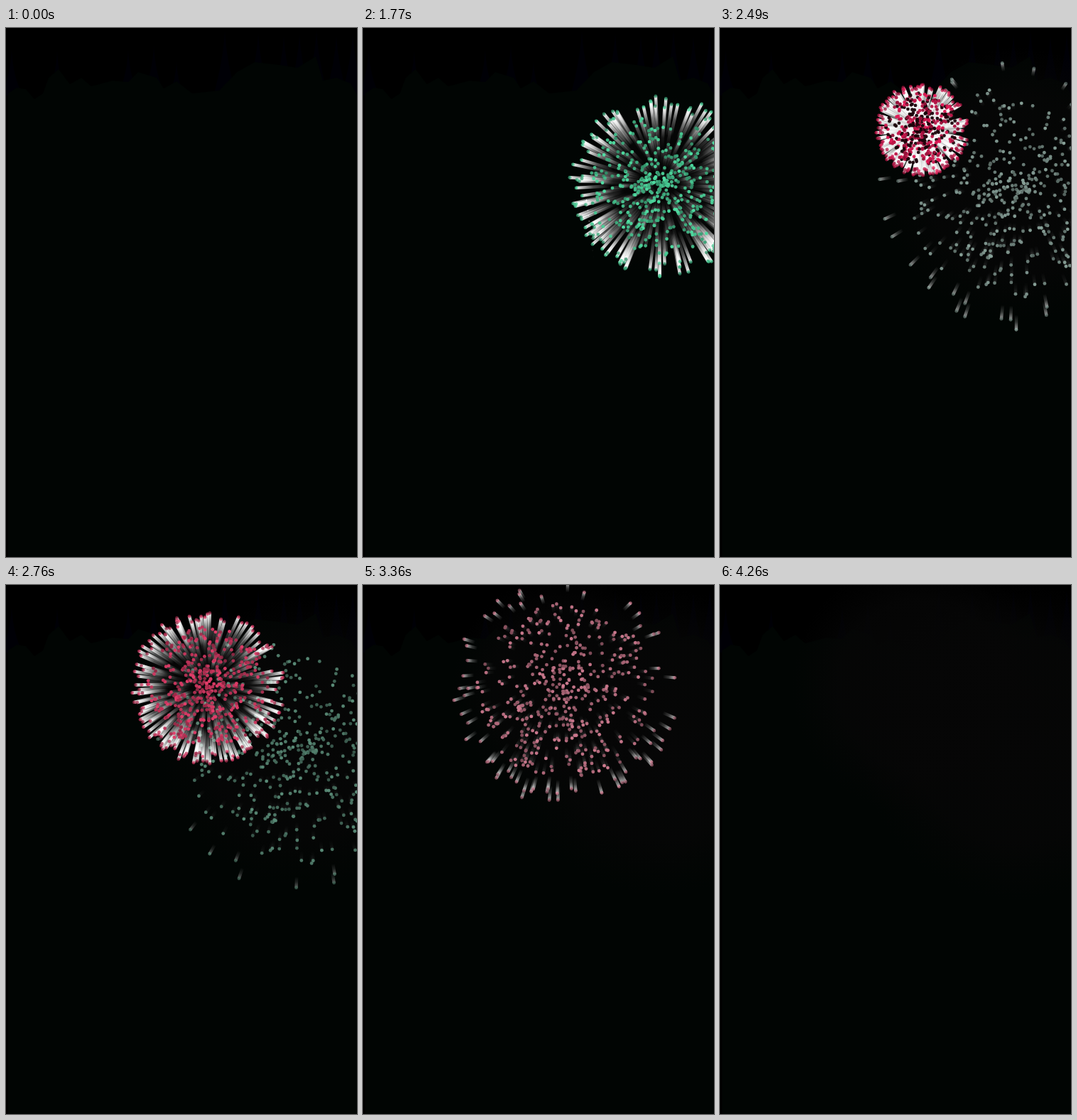
Write an HTML page with a canvas that moves like this. It is 494 px wide and 744 px high and loops after 6330 ms.

```html
<!DOCTYPE html>
<html lang="en">
<head>
<meta charset="utf-8">
<title>Fireworks</title>
<style>
  html, body { margin: 0; width: 100%; height: 100%; overflow: hidden; background: #000; }
  canvas { display: block; width: 100%; height: 100%; }
</style>
</head>
<body>
<canvas id="sky" width="494" height="744"></canvas>
<script>
const W = 494, H = 744, LOOP = 6330, STEP = 30;
const DRAG = 0.955, FALL = 0.006, TAIL = 9;
const ctx = document.getElementById('sky').getContext('2d');
const clamp = (v, lo = 0, hi = 1) => Math.min(hi, Math.max(lo, v));

function seeded(s) {
  return () => {
    s = (s + 0x6D2B79F5) | 0;
    let t = Math.imul(s ^ (s >>> 15), 1 | s);
    t = (t + Math.imul(t ^ (t >>> 7), 61 | t)) ^ t;
    return ((t ^ (t >>> 14)) >>> 0) / 4294967296;
  };
}

// Horizon of the dark glow and the spires above it, x then y
const RIDGE = [0, 92, 15, 84, 28, 86, 40, 100, 52, 92, 60, 70, 74, 58, 90, 79, 106, 70,
  120, 82, 150, 74, 172, 76, 186, 62, 212, 70, 222, 85, 240, 75, 262, 92, 300, 88,
  325, 62, 350, 48, 385, 52, 410, 56, 436, 40, 446, 74, 465, 70, 485, 78, 494, 94];
const SPIRES = [8, 30, 72, 32, 172, 30, 208, 24, 240, 46, 308, 3, 355, 6, 391, 10,
  413, 8, 437, 2, 465, 10, 488, 6];

// Rockets rise in steps: v is speed, a its loss, per step
const rockets = [
  { start: 480, x: 365, y: 731, vx: 1.9, v: 34.6, a: 1.16, steps: 25 },
  { start: 1140, x: 355, y: 729, vx: -1.93, v: 32.8, a: 0.9185, steps: 36 }
];

// Colour stops: age in seconds, r, g, b
const bursts = [
  { start: 1230, x: 419, y: 220, reach: 224, seed: 11,
    tint: [[0.27, 20, 215, 130], [0.54, 76, 214, 156], [1.26, 132, 156, 148], [1.77, 48, 118, 88]] },
  { start: 2220, x: 284, y: 142, reach: 190, seed: 29,
    tint: [[0.27, 218, 24, 82], [0.78, 218, 88, 118], [1.53, 182, 152, 162], [1.9, 110, 55, 70]] }
];
bursts.forEach(b => { b.sparks = makeSparks(b.seed); });

function makeSparks(seed) {
  const rnd = seeded(seed), list = [];
  for (let i = 0; i < 560; i++) {
    const rim = i < 130, angle = rnd() * Math.PI * 2;
    const speed = rim ? 1.02 - 0.16 * rnd() : 0.8 * rnd() ** 0.75;
    list.push({
      rim, dx: Math.cos(angle) * speed, dy: Math.sin(angle) * speed,
      life: rim ? 0.8 + 0.95 * rnd() ** 1.5 : 1.66 + 0.38 * rnd(),
      shade: 0.65 + 0.42 * rnd(), dark: !rim && rnd() < 0.4, phase: rnd() * 100
    });
  }
  return list;
}

function tintAt(stops, age) {
  if (age <= stops[0][0]) return stops[0].slice(1);
  for (let i = 1; i < stops.length; i++) {
    const a = stops[i - 1], b = stops[i];
    if (age <= b[0]) {
      const k = (age - a[0]) / (b[0] - a[0]);
      return [1, 2, 3].map(c => a[c] + (b[c] - a[c]) * k);
    }
  }
  return stops[stops.length - 1].slice(1);
}

const rgbOf = (rgb, scale, add = 0) =>
  `rgb(${rgb.map(c => Math.min(255, Math.round(c * scale + add))).join()})`;

function place(b, p, n) {
  const r = b.reach * (1 - DRAG ** n);
  return [b.x + p.dx * r, b.y + p.dy * r + FALL * n * n];
}

function disc(x, y, r) {
  ctx.beginPath();
  ctx.arc(x, y, r, 0, Math.PI * 2);
  ctx.fill();
}

function drawSky() {
  ctx.fillStyle = '#000';
  ctx.fillRect(0, 0, W, H);
  ctx.fillStyle = '#000006';
  for (let i = 0; i < SPIRES.length; i += 2) {
    const x = SPIRES[i], y = SPIRES[i + 1];
    ctx.beginPath();
    ctx.moveTo(x, y);
    ctx.quadraticCurveTo(x + 2, y + 40, x + 16, 95);
    ctx.lineTo(x - 16, 95);
    ctx.quadraticCurveTo(x - 2, y + 40, x, y);
    ctx.fill();
  }
  ctx.beginPath();
  ctx.moveTo(3, H);
  for (let i = 0; i < RIDGE.length; i += 2) ctx.lineTo(Math.max(3, RIDGE[i]), RIDGE[i + 1]);
  ctx.lineTo(W, H);
  ctx.fillStyle = '#010503';
  ctx.fill();
}

// Faint smoke that stays after a burst
function drawSmoke(b, n) {
  const r = 1 + b.reach * (1 - DRAG ** n);
  const g = ctx.createRadialGradient(b.x, b.y, 0, b.x, b.y, r);
  g.addColorStop(0, 'rgba(6,6,6,.95)');
  g.addColorStop(0.65, 'rgba(6,6,6,.8)');
  g.addColorStop(1, 'rgba(5,5,5,0)');
  ctx.fillStyle = g;
  disc(b.x, b.y, r);
}

function drawRocket(k, t) {
  const n = (t - k.start) / STEP;
  if (n <= 0 || n >= k.steps) return;
  const at = m => [k.x + k.vx * m, k.y - k.v * m + k.a * m * m / 2];
  ctx.fillStyle = '#fff';
  for (let i = 10; i > 0; i--) {
    const m = n - i / 2;
    if (m < 0) continue;
    const [x, y] = at(m);
    ctx.globalAlpha = 0.75 * (1 - i / 11) ** 1.6;
    ctx.fillRect(x - 0.8, y - 0.8, 1.7, 1.7);
  }
  const [x, y] = at(n);
  ctx.globalAlpha = 1;
  ctx.fillRect(x - 1.5, y - 0.5, 3, 1);
  ctx.fillRect(x - 0.5, y - 1.5, 1, 3);
}

function drawTail(b, p, n, power) {
  const [x0, y0] = place(b, p, Math.max(0, n - TAIL));
  const [x1, y1] = place(b, p, n);
  const g = ctx.createLinearGradient(x0, y0, x1, y1);
  g.addColorStop(0, 'rgba(255,255,255,0)');
  g.addColorStop(0.5, `rgba(255,255,255,${0.3 * power})`);
  g.addColorStop(1, `rgba(255,255,255,${power})`);
  ctx.strokeStyle = g;
  ctx.beginPath();
  ctx.moveTo(x0, y0);
  ctx.lineTo(x1, y1);
  ctx.stroke();
}

function drawBurst(b, t) {
  const n = (t - b.start) / STEP, age = (t - b.start) / 1000;
  if (n <= 0 || age >= 2.04) return;
  const live = b.sparks.filter(p => age < p.life);
  const rgb = tintAt(b.tint, age);
  const fade = clamp((1.95 - age) / 1.1);
  const inner = 0.2 + 0.7 * clamp(1 - n / 18);
  ctx.lineWidth = 4.4;
  for (const p of live) drawTail(b, p, n, fade * (p.rim ? 0.95 : inner));

  const size = 2.4 - clamp((age - 1.55) / 0.35) * 0.8;
  const dim = clamp((2.06 - age) / 0.25);
  for (const p of live) {
    const [x, y] = place(b, p, n);
    ctx.fillStyle = rgbOf(rgb, p.dark && n < 14 ? 0.12 : p.shade);
    ctx.globalAlpha = dim * (p.rim ? 0.75 : 0.95);
    disc(x, y, size);
    // Dying sparks flare now and then
    if (age > 1.62 && Math.sin(p.phase + n * 2.4) > 0.988) {
      ctx.fillStyle = rgbOf(rgb, 0.6, 70);
      ctx.globalAlpha = 0.4 * dim;
      disc(x, y, 7.5);
      disc(x, y, 4);
    }
  }
  ctx.globalAlpha = 1;
}

function draw(now) {
  const t = Math.floor((now % LOOP) / STEP) * STEP;
  drawSky();
  for (const b of bursts) if (t > b.start) drawSmoke(b, (t - b.start) / STEP);
  rockets.forEach(k => drawRocket(k, t));
  bursts.forEach(b => drawBurst(b, t));
}

const begin = performance.now();
function tick() {
  draw(performance.now() - begin);
  requestAnimationFrame(tick);
}
tick();
</script>
</body>
</html>
```
